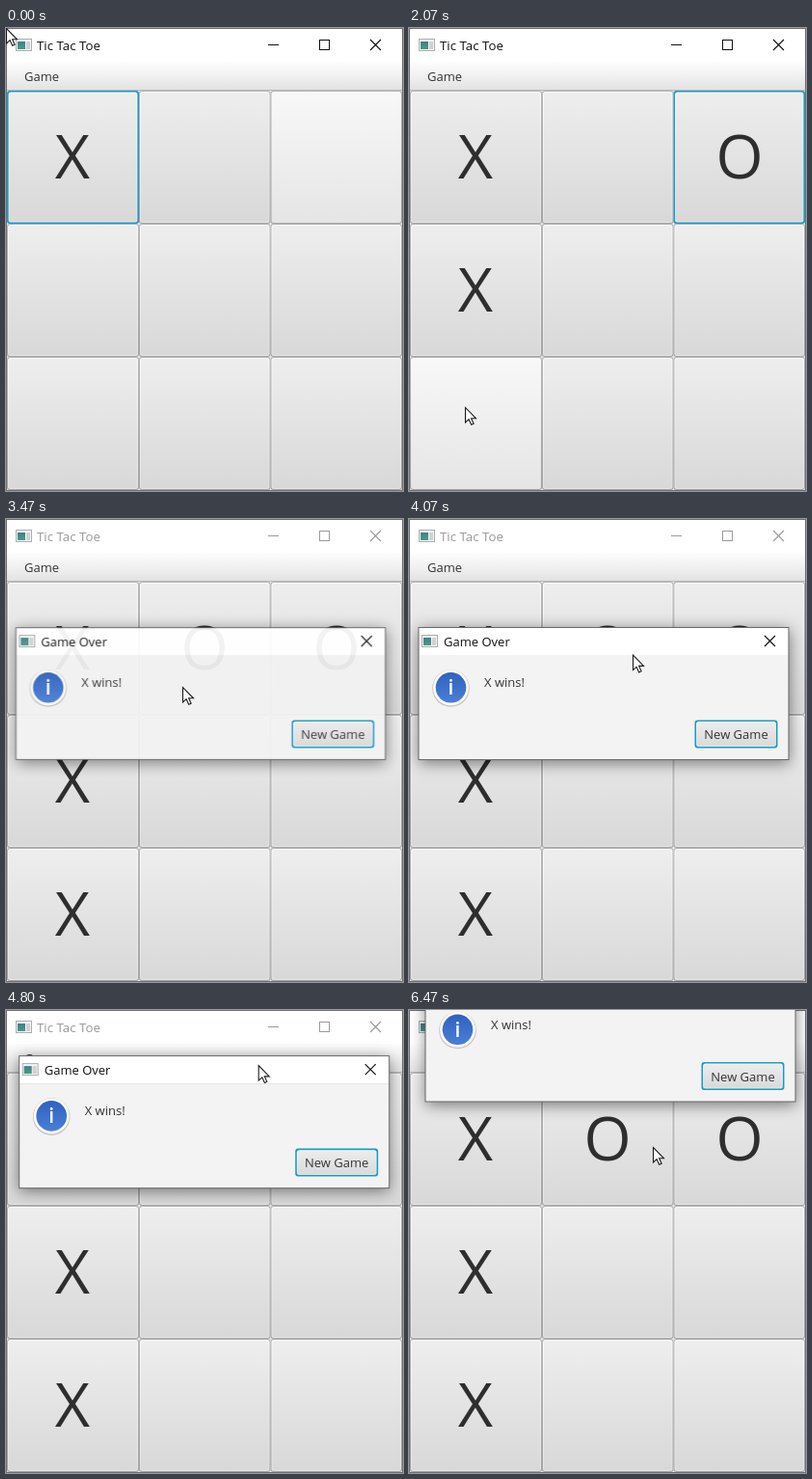
Write an HTML page with a canvas that moves like this. It is 412 px wide and 480 px high and loops after 6.79 s.

```html
<!DOCTYPE html>
<html lang="en">
<head>
<meta charset="utf-8">
<title>Tic Tac Toe</title>
<style>
html, body { margin: 0; width: 100%; height: 100%; overflow: hidden; background: #fff; }
canvas { display: block; }
</style>
</head>
<body>
<canvas id="stage" width="412" height="480"></canvas>
<script>
const W = 412, H = 480, LOOP = 6790, STEP = 1000 / 15;
const FONT = '"Open Sans", "Noto Sans", sans-serif';
const stage = document.getElementById('stage').getContext('2d');
const layer = document.createElement('canvas');
layer.width = W;
layer.height = H;
const layerCtx = layer.getContext('2d');
let g = stage;

const PRESS_1 = 800, MOVE_1 = 1000, PRESS_2 = 2990, MOVE_2 = 3130;
const OPEN = 3330, GRAB = 4410, DROP = 5860;

// Keys: time, x, y
const pointerKeys = [
  [0, 0, 0], [60, 0, 0], [66, 345, 122], [330, 338, 115], [600, 335, 112],
  [1070, 335, 112], [1470, 178, 318], [1800, 70, 384], [2067, 58, 393],
  [2270, 62, 399], [2600, 128, 290], [2930, 183, 174],
  [3740, 183, 174], [4200, 252, 127], [4400, 258, 122]
];
const dragKeys = [
  [GRAB, 0, 16], [4600, 0, 0], [4870, 5, -66], [5130, 12, -136],
  [5267, 12.5, -144.5], [5540, 9, -142], [5800, 7, -138.5]
];
const exitKeys = [[DROP, 265, -32], [6000, 262, 58], [6200, 253, 142]];

function along(keys, t) {
  if (t <= keys[0][0]) return keys[0].slice(1);
  for (let i = 1; i < keys.length; i++) {
    const [t1, x1, y1] = keys[i];
    if (t > t1) continue;
    const [t0, x0, y0] = keys[i - 1];
    const k = (t - t0) / (t1 - t0);
    return [x0 + (x1 - x0) * k, y0 + (y1 - y0) * k];
  }
  return keys[keys.length - 1].slice(1);
}

function pointerAt(t) {
  if (t < GRAB) return along(pointerKeys, t);
  if (t >= DROP) return along(exitKeys, t);
  const [dx, dy] = along(dragKeys, t);
  return [258 + dx, 106 + dy];
}

function rect(x, y, w, h, fill) {
  g.fillStyle = fill;
  g.fillRect(x, y, w, h);
}

function round(x, y, w, h, r, fill) {
  g.fillStyle = fill;
  g.beginPath();
  g.roundRect(x, y, w, h, r);
  g.fill();
}

function fade(y0, y1, ...colors) {
  const grad = g.createLinearGradient(0, y0, 0, y1);
  colors.forEach((c, i) => grad.addColorStop(i / (colors.length - 1), c));
  return grad;
}

function disc(x, y, r, fill) {
  g.fillStyle = fill;
  g.beginPath();
  g.arc(x, y, r, 0, 7);
  g.fill();
}

function text(str, x, y, size, color, align = 'left', weight = 400) {
  g.font = `${weight} ${size}px ${FONT}`;
  g.textAlign = align;
  g.fillStyle = color;
  g.fillText(str, x, y);
}

function cross(x, y, color) {
  g.strokeStyle = color;
  g.lineWidth = 1.15;
  g.beginPath();
  g.moveTo(x - 5.5, y - 5.5);
  g.lineTo(x + 5.5, y + 5.5);
  g.moveTo(x + 5.5, y - 5.5);
  g.lineTo(x - 5.5, y + 5.5);
  g.stroke();
}

function appIcon(x, y) {
  rect(x, y, 17, 13, '#a9adb0');
  rect(x + 1, y + 1, 15, 11, '#f4f5f5');
  rect(x + 2, y + 3, 8, 8, fade(y + 3, y + 11, '#3f7f8e', '#4c9a80'));
  rect(x + 11, y + 3, 4, 8, '#cfd2d4');
}

function button(x, y, w, h, look, focused) {
  const [top, bottom] = {
    plain: ['#eeeeee', '#d8d8d8'],
    hover: ['#f8f8f8', '#e5e5e5'],
    pressed: ['#dedede', '#cacaca']
  }[look];
  round(x, y, w, h, 3, focused ? '#1a9ac8' : fade(y, y + h, '#b6b6b6', '#a4a4a4'));
  const b = focused ? 1.6 : 1;
  if (look !== 'pressed')
    round(x + b, y + b, w - 2 * b, h - 2 * b, 2.5, fade(y, y + h, '#fcfcfc', '#e4e4e4'));
  const c = look === 'pressed' ? b : b + 1;
  round(x + c, y + c, w - 2 * c, h - 2 * c, 2, fade(y, y + h, top, bottom));
}

function cellAt(x, y) {
  if (y < 65 || y > 479 || x < 1 || x > 411) return -1;
  return Math.min(2, Math.floor((y - 65) / 138)) * 3 + Math.min(2, Math.floor((x - 1) / 136.7));
}

function board(t, hovered) {
  const marks = { 0: 'X' };
  if (t >= MOVE_1) Object.assign(marks, { 2: 'O', 3: 'X' });
  if (t >= MOVE_2) Object.assign(marks, { 1: 'O', 6: 'X' });
  const down = (t >= PRESS_1 && t < MOVE_1) || (t >= PRESS_2 && t < MOVE_2);
  const focus = t >= MOVE_2 ? -1 : t >= PRESS_2 ? 1 : t >= PRESS_1 ? 2 : 0;
  const edges = [1, 138, 274.5, 411];
  for (let i = 0; i < 9; i++) {
    const col = i % 3, row = Math.floor(i / 3);
    const x = edges[col], y = 65 + row * 138;
    const look = i !== hovered ? 'plain' : down ? 'pressed' : 'hover';
    button(x, y, edges[col + 1] - x, 138, look, i === focus);
    if (marks[i]) text(marks[i], 69 + col * 137, 156 + row * 138, 63, '#2e2e2e', 'center');
  }
}

function mainWindow(t) {
  const active = t < MOVE_2;
  const ink = active ? '#111' : '#999';
  rect(0, 0, W, H, '#707070');
  rect(1, 1, W - 2, H - 2, '#fff');
  appIcon(10, 11);
  text('Tic Tac Toe', 32, 22.5, 13.3, ink);
  rect(272, 17, 11, 1, ink);
  g.strokeStyle = ink;
  g.lineWidth = 1;
  g.strokeRect(325.5, 12.5, 10, 10);
  cross(383.5, 17.5, ink);

  rect(1, 35, W - 2, 29, fade(35, 64, '#fdfdfd', '#f1f1f1', '#e2e2e2'));
  rect(1, 64, W - 2, 1, '#b8b8b8');
  rect(1, 65, W - 2, H - 66, '#e9e9e9');
  text('Game', 19, 55, 13, '#333');

  const [px, py] = pointerAt(t);
  board(t, !active ? -1 : t < 60 ? 2 : cellAt(px, py));
}

function dialog(t) {
  if (t < OPEN) return;
  const k = Math.min(1, (t - OPEN) / 200);
  const alpha = 1 - (1 - k) ** 2.4;
  const [dx, dy] = along(dragKeys, t);

  g = layerCtx;
  g.clearRect(0, 0, W, H);
  g.save();
  g.translate(dx, dy);
  g.save();
  g.shadowColor = 'rgba(0,0,0,.5)';
  g.shadowBlur = 15;
  g.shadowOffsetY = 3;
  rect(9.5, 96, 385, 138, '#686868');
  g.restore();
  rect(10.5, 97, 383, 28, '#fff');
  rect(10.5, 125, 383, 108, '#f3f3f3');
  appIcon(13, 104);
  text('Game Over', 36, 116, 13, '#111');
  cross(374.5, 110.5, '#111');

  disc(43.5, 159.5, 19.3, '#c4c4c4');
  disc(43.5, 158.8, 18.5, '#fbfbfb');
  disc(43.5, 158.8, 15.8, fade(143, 175, '#2f62bd', '#4a7fd8'));
  text('i', 43.5, 166, 21, '#fff', 'center', 600);
  text('X wins!', 78, 158, 13, '#333');
  button(296.5, 192.5, 86, 29, 'plain', true);
  text('New Game', 339.5, 212, 13, '#333', 'center');
  g.restore();

  g = stage;
  const s = 0.97 + 0.03 * alpha;
  g.save();
  g.globalAlpha = alpha;
  g.translate(202, 181);
  g.scale(s, s);
  g.drawImage(layer, -202, -181);
  g.restore();
}

function pointer(x, y) {
  const shape = [[0, 0], [0, 15.5], [3.6, 12.2], [6.2, 17.8], [8.6, 16.7], [6.1, 11.3], [11, 11.3]];
  g.beginPath();
  shape.forEach(([a, b]) => g.lineTo(x + 0.5 + a, y + 0.5 + b));
  g.closePath();
  g.fillStyle = '#fff';
  g.fill();
  g.strokeStyle = '#1c1c1c';
  g.lineWidth = 1.1;
  g.stroke();
}

function draw(now) {
  const t = Math.floor(((now % LOOP) + 4) / STEP) * STEP;
  mainWindow(t);
  dialog(t);
  pointer(...pointerAt(t));
}

const start = performance.now();
function tick() {
  draw(performance.now() - start);
  requestAnimationFrame(tick);
}
tick();
</script>
</body>
</html>
```
